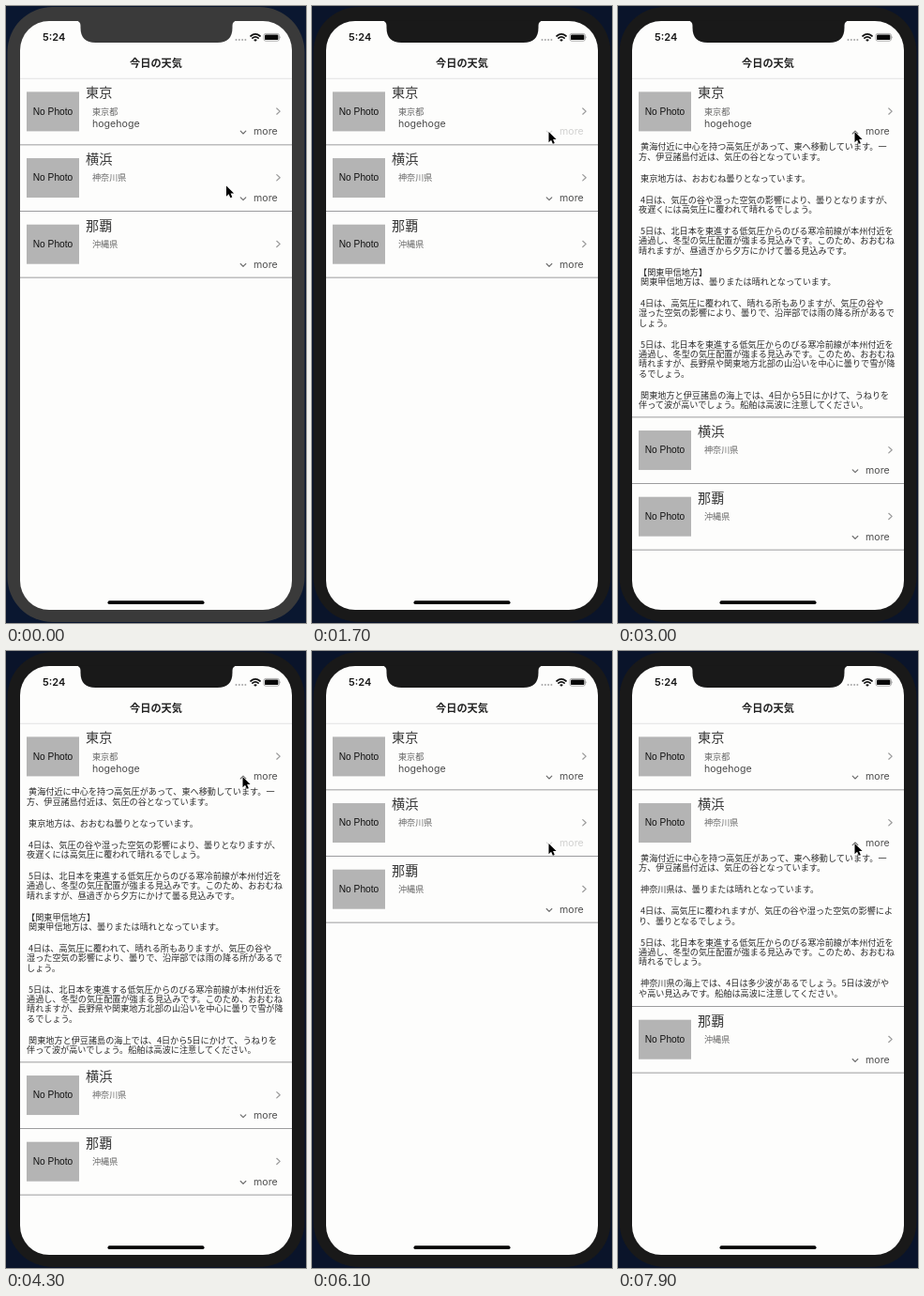
Recreate the animation shown at these times as an HTML page. Size 320 by 657 pixels, loop 8000 ms.

```html
<!DOCTYPE html>
<html lang="ja">
<head>
<meta charset="utf-8">
<title>今日の天気</title>
<style>
  html, body { margin: 0; width: 100%; height: 100%; overflow: hidden; background: #0a1730; }
  svg { display: block; width: 100vw; height: 100vh; }
  text { font-family: "Noto Sans CJK JP", "Noto Sans CJK", sans-serif; white-space: pre; }
  .latin { font-family: Inter, Roboto, sans-serif; }
  .line { fill: none; stroke-linecap: round; stroke-linejoin: round; }
</style>
</head>
<body>
<svg viewBox="0 0 320 657" preserveAspectRatio="none">
  <rect id="backdrop" width="320" height="657"/>
  <rect id="bezel" x="1.5" y="1" width="317" height="655" rx="48"/>
  <rect x="15" y="16" width="290" height="627" rx="31" fill="#fdfdfc"/>
  <path id="notch" d="M74.5 15.5Q79.5 16 79.5 21V23Q79.5 39 95.5 39H225.5Q241.5 39 241.5 23V21Q241.5 16 246.5 15.5Z"/>

  <text class="latin" x="39" y="37" font-size="11" font-weight="600" fill="#151515">5:24</text>
  <g fill="#a8a8a8">
    <circle cx="245.5" cy="36" r="1"/><circle cx="248.8" cy="36" r="1"/>
    <circle cx="252.1" cy="36" r="1"/><circle cx="255.4" cy="36" r="1"/>
  </g>
  <g class="line" stroke="#111" stroke-width="1.7" stroke-linecap="butt">
    <path d="M261 32Q266 27.6 271 32M262.9 34.2Q266 31.4 269.1 34.2"/>
    <path d="M265.3 36.2L266 36.7L266.7 36.2"/>
  </g>
  <rect x="274.9" y="29.4" width="16.6" height="7.8" rx="2.2" fill="none" stroke="#999" stroke-width=".8"/>
  <rect x="276" y="30.5" width="14.4" height="5.6" rx="1.2" fill="#080808"/>
  <path d="M292.4 32Q293.8 33.3 292.4 34.7Z" fill="#999"/>

  <text x="160" y="65" font-size="11.2" font-weight="700" text-anchor="middle" fill="#222">今日の天気</text>
  <path d="M15 77.3H305" stroke="#dededc" stroke-width=".8"/>
  <g id="list"></g>
  <rect x="108.5" y="633.3" width="103" height="3.8" rx="1.9" fill="#050505"/>
  <path id="cursor" d="M0 0V11.2L2.6 8.8L4.4 12.8L6.3 12L4.6 8.1H8.1Z"
        fill="#000" stroke="#fdfdfc" stroke-width=".9" paint-order="stroke"/>
</svg>
<script>
const LOOP = 8000, STEP = 100;
const LIST_TOP = 77.2, ROW_HEIGHT = 70.65;
const LINE_STEP = 10.4, BLANK_STEP = 12.5;

const tokyoForecast = ` 黄海付近に中心を持つ高気圧があって、東へ移動しています。一
方、伊豆諸島付近は、気圧の谷となっています。

 東京地方は、おおむね曇りとなっています。

 4日は、気圧の谷や湿った空気の影響により、曇りとなりますが、
夜遅くには高気圧に覆われて晴れるでしょう。

 5日は、北日本を東進する低気圧からのびる寒冷前線が本州付近を
通過し、冬型の気圧配置が強まる見込みです。このため、おおむね
晴れますが、昼過ぎから夕方にかけて曇る見込みです。

【関東甲信地方】
 関東甲信地方は、曇りまたは晴れとなっています。

 4日は、高気圧に覆われて、晴れる所もありますが、気圧の谷や
湿った空気の影響により、曇りで、沿岸部では雨の降る所があるで
しょう。

 5日は、北日本を東進する低気圧からのびる寒冷前線が本州付近を
通過し、冬型の気圧配置が強まる見込みです。このため、おおむね
晴れますが、長野県や関東地方北部の山沿いを中心に曇りで雪が降
るでしょう。

 関東地方と伊豆諸島の海上では、4日から5日にかけて、うねりを
伴って波が高いでしょう。船舶は高波に注意してください。`;

const kanagawaForecast = ` 黄海付近に中心を持つ高気圧があって、東へ移動しています。一
方、伊豆諸島付近は、気圧の谷となっています。

 神奈川県は、曇りまたは晴れとなっています。

 4日は、高気圧に覆われますが、気圧の谷や湿った空気の影響によ
り、曇りとなるでしょう。

 5日は、北日本を東進する低気圧からのびる寒冷前線が本州付近を
通過し、冬型の気圧配置が強まる見込みです。このため、おおむね
晴れるでしょう。

 神奈川県の海上では、4日は多少波があるでしょう。5日は波がや
や高い見込みです。船舶は高波に注意してください。`;

const cities = [
  { name: '東京', area: '東京都', note: 'hogehoge', forecast: tokyoForecast, extra: 290 },
  { name: '横浜', area: '神奈川県', note: '', forecast: kanagawaForecast, extra: 160 },
  { name: '那覇', area: '沖縄県', note: '', forecast: '', extra: 0 },
];

// The button dims at `down`, the row opens or closes at `toggle`, full colour is back at `clear`.
const taps = [
  { row: 0, down: 1700, toggle: 1800, clear: 2200 },
  { row: 0, down: 3100, toggle: 3100, clear: 3200 },
  { row: 0, down: 4000, toggle: 4100, clear: 4300 },
  { row: 0, down: 4700, toggle: 4700, clear: 4800 },
  { row: 1, down: 6100, toggle: 6200, clear: 6600 },
];

// time, x, y of the pointer tip
const pointerPath = [
  [0, 235, 191.5], [1100, 252.5, 134], [4750, 252.5, 134], [5400, 246, 212],
  [5600, 251, 219], [5700, 252, 218], [5800, 252, 218], [6000, 252.5, 205], [LOOP, 252.5, 205],
];

const byId = id => document.getElementById(id);

function forecastLines(forecast) {
  let y = 76.2;
  return forecast.split('\n').map(line => {
    if (!line) {
      y += BLANK_STEP;
      return '';
    }
    const markup = `<text x="22" y="${y.toFixed(1)}">${line}</text>`;
    y += LINE_STEP;
    return markup;
  }).join('');
}

byId('list').innerHTML = cities.map(city => `
  <g class="row">
    <rect x="22" y="14.2" width="56" height="42" fill="#b4b4b4"/>
    <text x="50" y="38.6" font-size="10.2" text-anchor="middle" fill="#111"
      style="font-family:'Liberation Sans',sans-serif">No Photo</text>
    <text x="85" y="20" font-size="14.2" fill="#383838">${city.name}</text>
    <text x="92" y="38.5" font-size="9.1" fill="#666">${city.area}</text>
    <text class="latin" x="92" y="51.4" font-size="10.6" fill="#4b4b4b">${city.note}</text>
    <path class="line" d="M288.8 31.8L292.2 34.9L288.8 38" stroke="#999" stroke-width="1.2"/>
    <g class="more">
      <path class="chevron line" stroke="#6a6a6a" stroke-width="1.1"/>
      <text class="latin" x="264" y="60" font-size="10.6" fill="#505050">more</text>
    </g>
    <g class="forecast" font-size="9.15" font-weight="500" fill="#2a2a2a">${forecastLines(city.forecast)}</g>
    <path class="divider" d="M15 0H305" stroke="#9c9c9e" stroke-width="1"/>
  </g>`).join('');

const rows = [...document.querySelectorAll('.row')].map(group => ({
  group,
  more: group.querySelector('.more'),
  chevron: group.querySelector('.chevron'),
  forecast: group.querySelector('.forecast'),
  divider: group.querySelector('.divider'),
}));

function moreOpacity(index, t) {
  const tap = taps.find(({ row, down, clear }) => row === index && t >= down && t < clear);
  if (!tap) return 1;
  const fadeStart = tap.toggle + STEP;
  return 0.25 + 0.75 * Math.max(0, (t - fadeStart) / (tap.clear - fadeStart));
}

function pointerAt(t) {
  const next = Math.max(1, pointerPath.findIndex(([time]) => time > t));
  const [t0, x0, y0] = pointerPath[next - 1];
  const [t1, x1, y1] = pointerPath[next];
  const p = (t - t0) / (t1 - t0);
  const ease = p * p * (3 - 2 * p);
  return [x0 + (x1 - x0) * ease, y0 + (y1 - y0) * ease];
}

function draw(t) {
  const dark = t >= 1700;
  const bezelColor = dark ? '#191919' : '#3a3a3a';
  byId('backdrop').setAttribute('fill', dark ? '#0a142a' : '#0a1730');
  byId('bezel').setAttribute('fill', bezelColor);
  byId('notch').setAttribute('fill', bezelColor);

  let y = LIST_TOP;
  rows.forEach((row, i) => {
    const open = taps.filter(tap => tap.row === i && t >= tap.toggle).length % 2 === 1;
    const height = ROW_HEIGHT + (open ? cities[i].extra : 0);
    row.group.setAttribute('transform', `translate(0 ${y})`);
    row.divider.setAttribute('transform', `translate(0 ${height})`);
    row.forecast.setAttribute('visibility', open ? 'visible' : 'hidden');
    row.chevron.setAttribute('d', open ? 'M250.2 58.8L253 56L255.8 58.8' : 'M250.2 56L253 58.8L255.8 56');
    row.more.setAttribute('opacity', moreOpacity(i, t));
    y += height;
  });

  byId('cursor').setAttribute('transform', `translate(${pointerAt(t).join(' ')})`);
}

function tick() {
  const t = performance.now() % LOOP;
  draw(Math.floor(t / STEP) * STEP);
  requestAnimationFrame(tick);
}
tick();
</script>
</body>
</html>
```
